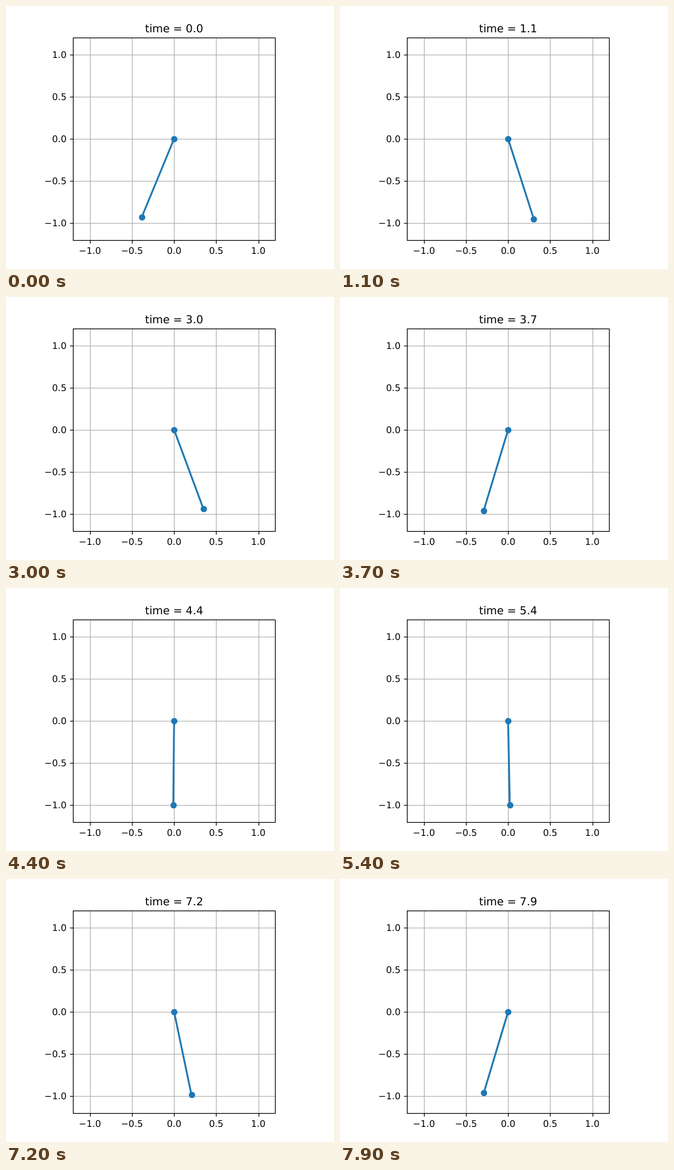
Recreate the animation shown at these times as an HTML page. Size 500 px wide and 400 px high, loop 8 s.

```html
<!DOCTYPE html>
<html lang="en">
<head>
<meta charset="utf-8">
<title>Damped pendulum</title>
<style>
  html, body { margin: 0; width: 100%; height: 100%; overflow: hidden; background: #fff; }
  svg { display: block; }
  text {
    font: 13.889px "DejaVu Sans", sans-serif;
    text-rendering: geometricPrecision;
    white-space: pre;
  }
  #title { font-size: 16.667px; }
  .grid { stroke: #b0b0b0; stroke-width: 1.11; }
  .axis { stroke: #000; stroke-width: 1.11; fill: none; }
  #rod { stroke: #1f77b4; stroke-width: 2.78; }
  circle { fill: #1f77b4; }
</style>
</head>
<body>
<svg width="500" height="400" viewBox="0 0 500 400">
  <g id="grid"></g>
  <line id="rod"/>
  <circle id="pivot" r="4.86"/>
  <circle id="bob" r="4.86"/>
  <rect class="axis" x="102.5" y="48.5" width="308" height="308"/>
  <g id="ticks"></g>
  <text id="title" x="211.9" y="40"></text>
</svg>
<script>
const CX = 256.25, CY = 202, UNIT = 308 / 2.4;
const STEP = 100, COUNT = 80;
const GRAVITY = 9.81, DAMPING = 0.1;

const byId = id => document.getElementById(id);
const px = x => CX + x * UNIT;
const py = y => CY - y * UNIT;
const snap = v => Math.round(v) + 0.5;

function add(parent, tag, attrs, text = '') {
  const node = document.createElementNS('http://www.w3.org/2000/svg', tag);
  set(node, attrs);
  node.textContent = text;
  byId(parent).append(node);
}

function set(node, attrs) {
  for (const key in attrs) node.setAttribute(key, attrs[key]);
}

function addLine(parent, cls, x1, y1, x2, y2) {
  add(parent, 'line', { class: cls, x1, y1, x2, y2 });
}

for (const v of [-1, -0.5, 0, 0.5, 1]) {
  const x = snap(px(v)), y = snap(py(v));
  const label = v.toFixed(1).replace('-', '\u2212');
  addLine('grid', 'grid', x, 48.5, x, 356.5);
  addLine('grid', 'grid', 102.5, y, 410.5, y);
  addLine('ticks', 'axis', x, 356.5, x, 361.4);
  addLine('ticks', 'axis', 97.6, y, 102.5, y);
  add('ticks', 'text', { x: px(v), y: 377, 'text-anchor': 'middle' }, label);
  add('ticks', 'text', { x: 92.3, y: Math.round(py(v)) + 5, 'text-anchor': 'end' }, label);
}

// Damped pendulum integrated with the midpoint rule, one angle kept per step.
function swing(angle, speed) {
  const angles = [], sub = 200, dt = STEP / 1000 / sub;
  const accel = (a, s) => -GRAVITY * Math.sin(a) - DAMPING * s;
  for (let i = 0; i < COUNT; i++) {
    angles.push(angle);
    for (let j = 0; j < sub; j++) {
      const midAngle = angle + speed * dt / 2;
      const midSpeed = speed + accel(angle, speed) * dt / 2;
      angle += midSpeed * dt;
      speed += accel(midAngle, midSpeed) * dt;
    }
  }
  return angles;
}

const angles = swing(-Math.PI / 8, 0.623);
const rod = byId('rod'), bob = byId('bob'), title = byId('title');
set(rod, { x1: CX, y1: CY });
set(byId('pivot'), { cx: snap(CX), cy: snap(CY) });

let shown = -1;
function draw(now) {
  const i = Math.floor(now / STEP) % COUNT;
  if (i !== shown) {
    shown = i;
    const x = px(Math.sin(angles[i])), y = py(-Math.cos(angles[i]));
    set(rod, { x2: x, y2: y });
    set(bob, { cx: snap(x), cy: snap(y) });
    title.textContent = 'time = ' + (i / 10).toFixed(1);
  }
}

const start = performance.now();
function tick() {
  draw(performance.now() - start);
  requestAnimationFrame(tick);
}
tick();
</script>
</body>
</html>
```
